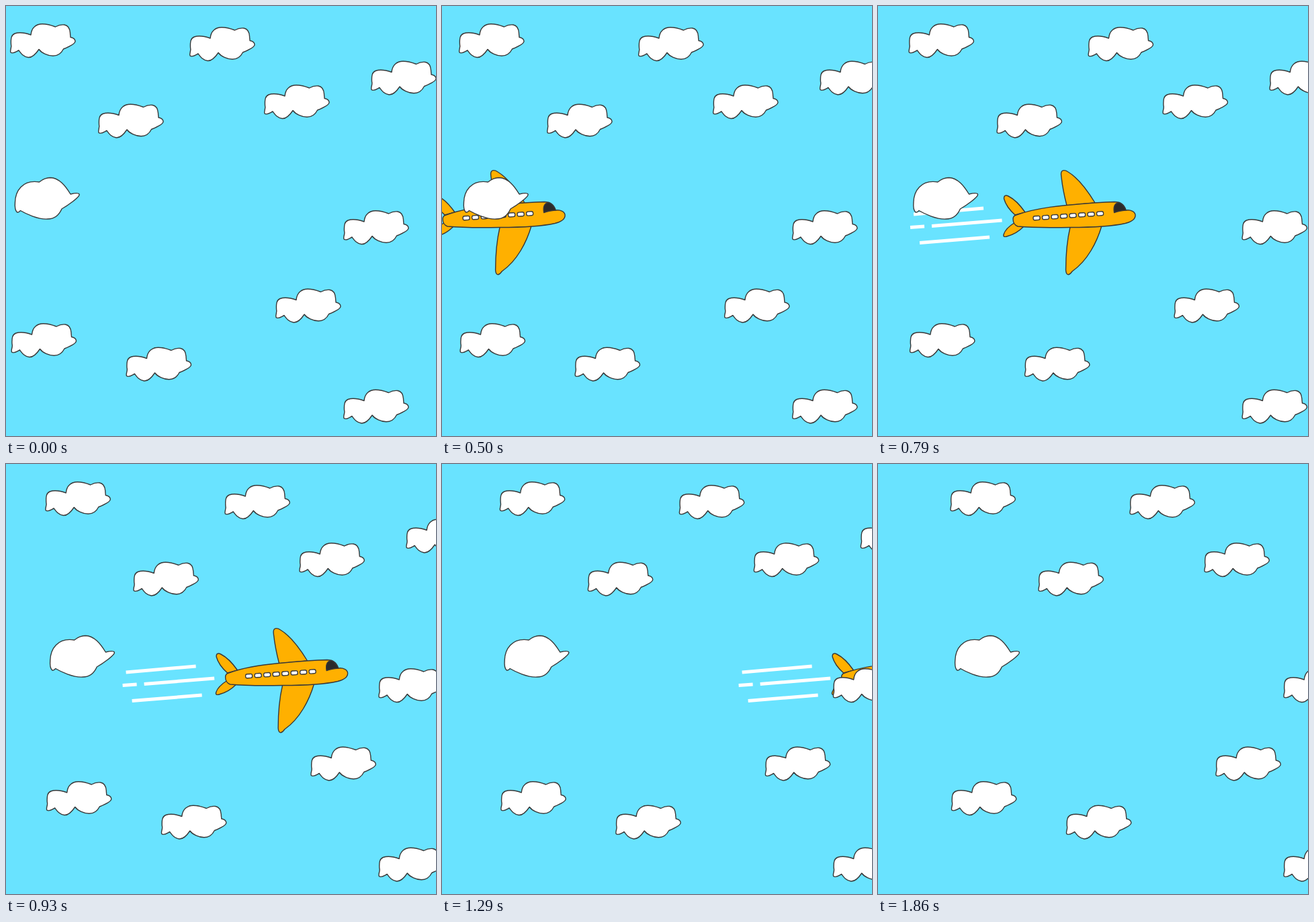
An HTML page for the animation above (1930 ms loop, 640 px wide and 640 px high).

```html
<!DOCTYPE html>
<html lang="en">
<head>
<meta charset="utf-8">
<title>Plane among clouds</title>
<style>
  html, body { margin: 0; width: 100%; height: 100%; overflow: hidden; background: #69e3ff; }
  svg { display: block; width: 100vw; height: 100vh; }
  .ink { stroke: #383838; stroke-width: 1.4; stroke-linejoin: round; }
  #plane { fill: #ffb000; }
  #clouds, #windows { fill: #fff; }
  .streaks { stroke: #fff; stroke-width: 5; fill: none; }
</style>
</head>
<body>
<svg viewBox="0 0 640 640">
  <defs>
    <path id="cloud" d="M1 43C-.5 39 3 36 1.500 31C1 22 2 17 7 15C14 12.500 24 14.500 31 17C32 6 39 .8 48 .8C56 .8 61 2.500 67.500 5C72 2.500 77 1.500 81 2C87 3 89 8 89.500 14C89.500 17 90 18 90 20.500C94.500 21.500 97 24 97 26.500C97 30 87 35 79.500 38C76.500 44 71 48.300 64 48.300C56 48 47 44 43 38.500C38 46 33 51 27 50.500C19 49 16 44 13 40C9 42 4 46 1 43Z"/>
  </defs>
  <g id="plane">
    <path class="streaks" d="M53 310L157 301M48 329.500L69 328M80 327.500L184.500 319M62 352.500L166 344"/>
    <g class="ink">
      <path d="M204 311C195 303 190 296 187.500 287C187 282 190 281 194 283C204 288 212 297 219 307Z"/>
      <path d="M204 322C196 327 189 333 187 340C186 344 189 344 193 342.500C202 340 210 335 216 329Z"/>
      <path d="M281 297C277 282 274 266 272.500 251C272 244 277 243 283 247C298 256 312 275 323 293Z"/>
      <path d="M286 329C282 346 279.500 372 279.500 393C280 401 284 402 289 395C312 379 326 351 333 327Z"/>
      <path d="M206 311C225 304 253 299 281 296.500C307 294 330 292 352 291.500C362 291.500 367 297 369 304C376 303 383 306 383 311.500C383 317 378 321 368 323.500C348 328 318 329.500 286 329.500C258 330 231 330 208 328C203 326 201 322 201 317.500C201 314 203 311.500 206 311Z"/>
      <path fill="#2b2b2b" d="M351.500 307.500C350 299 352 293 359 292.500C363.500 294.500 367 299 369 304C363 304.500 357 305.500 351.500 307.500Z"/>
      <g id="windows"></g>
    </g>
  </g>
  <g id="clouds" class="ink">
    <path d="M49.500 262C55 257.500 61 255.500 66 255.500C79 256 88 267 96 280C102 278.500 108 278 109 280C111 284 90 298 83 302C79 311 73 317 62 317C48 318 29 309 21.500 304.500C19.500 306 19 307.500 16.500 307C13 304 13 298 13.500 292C14 276 24 258 49.500 262Z"/>
  </g>
</svg>
<script>
  const LOOP = 1930, LAST = 47;
  const clouds = document.getElementById('clouds');
  const plane = document.getElementById('plane');
  const windows = document.getElementById('windows');

  function add(parent, tag, attrs) {
    const el = document.createElementNS('http://www.w3.org/2000/svg', tag);
    for (const key in attrs) el.setAttribute(key, attrs[key]);
    parent.appendChild(el);
  }

  const spots = [
    [6, 26], [273, 31], [543, 81.5], [384, 117], [137, 145.5],
    [502, 304], [401, 420.5], [7.5, 472], [178.5, 507.5], [502, 570.5]
  ];
  for (const [x, y] of spots) add(clouds, 'use', { href: '#cloud', x, y });

  for (let i = 0; i < 8; i++) {
    add(windows, 'rect', {
      x: -5, y: -3, width: 10, height: 6, rx: 2.5,
      transform: `translate(${236 + 13.5 * i} ${315.6 - 0.95 * i}) rotate(-4)`
    });
  }

  const slide = (el, x) => el.setAttribute('transform', `translate(${x.toFixed(2)} 0)`);

  // The 25 fps motion is shown at 14 fps, on a 10 ms clock.
  function progress(ms) {
    const shown = Math.floor((Math.floor(ms / 10) * 10 + 5) * 0.014);
    const x = Math.min(1, Math.ceil(shown * 25 / 14) / LAST);
    return x * x * (3 - 2 * x);
  }

  const start = performance.now();
  function draw() {
    const p = progress((performance.now() - start) % LOOP);
    slide(clouds, 101.3 * p);
    slide(plane, 990 * p - 385.2);
    requestAnimationFrame(draw);
  }
  draw();
</script>
</body>
</html>
```
